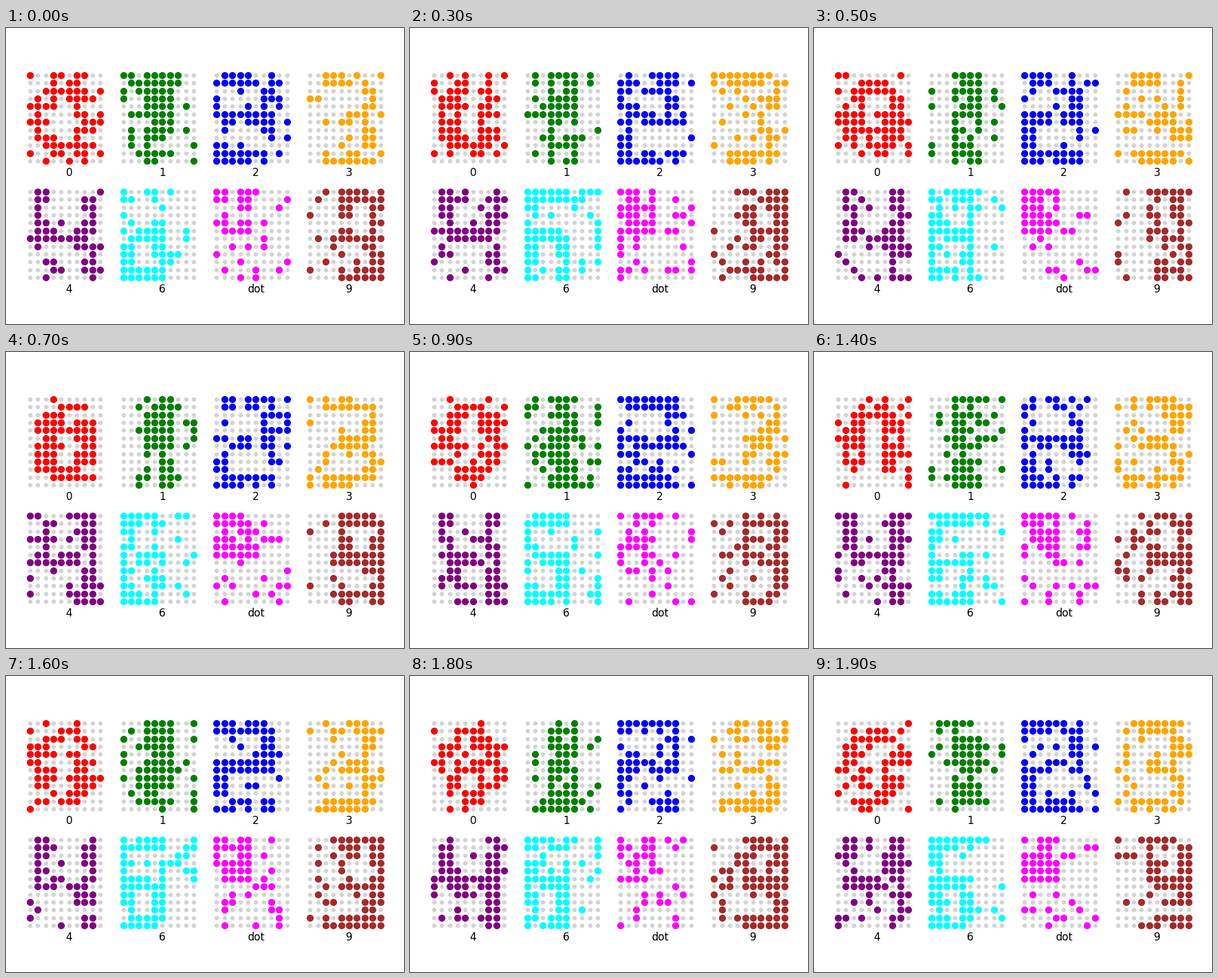
A matplotlib script for the animation above (2400 ms loop, 630 by 470 pixels).

```python
import numpy as np
import matplotlib.pyplot as plt
from matplotlib.animation import FuncAnimation

W, H, DPI = 630, 470, 100
ROWS, COLS = 12, 10
PITCH = 12.37
STEPS, FRAMES, INTERVAL = 20, 24, 100
FLIP = 0.19
SEED = 11

row, col = np.indices((ROWS, COLS))


def segments(left, right, names):
    """Seven-segment shape, two cells thick, between two columns."""
    wide = (col >= left) & (col <= right)
    upper, lower = row <= 6, row >= 5
    west, east = wide & (col < left + 2), wide & (col > right - 2)
    parts = {
        "a": wide & (row < 2), "g": wide & upper & lower,
        "d": wide & (row >= ROWS - 2),
        "f": west & upper, "e": west & lower,
        "b": east & upper, "c": east & lower,
    }
    return np.any([parts[n] for n in names], axis=0)


def zero():
    dx, dy = abs(col - 4.5), abs(row - 5.5)
    body = (dx < 4) & (dy < 5) & (dx + dy <= 6)
    return body & ~((dx < 1) & (dy < 3))


def three():
    bars = segments(2, 8, "abcd")
    bars[[0, -1], 8] = False
    return np.where((row == 5) | (row == 6), abs(col - 5.5) < 2, bars)


glyphs = [
    ("0", "red", zero()),
    ("1", "green", abs(col - 4.5) < 2),
    ("2", "blue", segments(0, 7, "abged")),
    ("3", "orange", three()),
    ("4", "purple", segments(1, 8, "fgbc")),
    ("6", "cyan", segments(0, 5, "afgecd")),
    ("dot", "magenta", (row < 6) & (col < 5)),
    ("9", "brown", segments(4, 9, "abfgcd")),
]

fig = plt.figure(figsize=(W / DPI, H / DPI), dpi=DPI, facecolor="white")
ax = fig.add_axes([0, 0, 1, 1])
ax.set(xlim=(0, W), ylim=(H, 0))
ax.axis("off")

panels = []
for i, (name, color, clean) in enumerate(glyphs):
    left, top = 37.8 + 147.8 * (i % 4), 75 + 185 * (i // 4)
    xs, ys = left + PITCH * col, top + PITCH * row
    ax.plot(xs.ravel(), ys.ravel(), "o", ms=4, color="lightgray")
    lit, = ax.plot([], [], "o", ms=7, color=color)
    ax.text(left + 5 * PITCH, top + 160.3, name, ha="center", va="baseline",
            fontsize=12, family="DejaVu Sans", color="black")
    panels.append((lit, clean, xs, ys))


def update(frame):
    # The last noisy state is held until the loop restarts.
    rng = np.random.default_rng([SEED, min(frame, STEPS - 1)])
    for lit, clean, xs, ys in panels:
        on = clean ^ (rng.random(clean.shape) < FLIP)
        lit.set_data(xs[on], ys[on])
    return [p[0] for p in panels]


anim = FuncAnimation(fig, update, frames=FRAMES, interval=INTERVAL,
                     init_func=lambda: update(0), repeat=True, repeat_delay=0)
plt.show()
```
